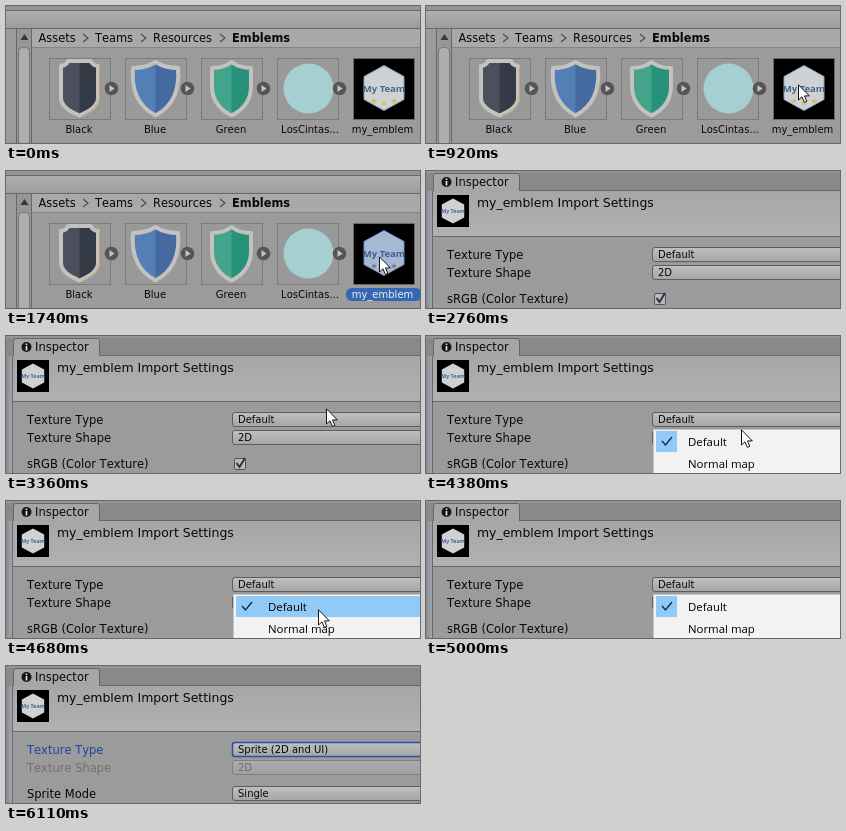
An HTML page that plays this animation: 414 by 137 pixels, repeating every 8530 ms.

```html
<!DOCTYPE html>
<html lang="en">
<head>
<meta charset="utf-8">
<title>Emblem import settings</title>
<style>
html, body { margin: 0; width: 100%; height: 100%; overflow: hidden; background: #9b9b9b; }
svg { display: block; width: 414px; height: 137px; }
text { font: 11.4px "DejaVu Sans", sans-serif; font-kerning: none; fill: #080808; }
.bold { font-weight: bold; }
.caption { font-size: 10px; text-anchor: middle; }
.title { font-size: 12.45px; }
.label { font-size: 11.5px; }
.value { font-size: 10px; }
.menu text { font: 11.4px "Open Sans", "Noto Sans", sans-serif; fill: #000; }
.badge { font: bold 9.5px "Open Sans", sans-serif; text-anchor: middle; fill: #46678f; }
.line { stroke: #686868; fill: none; }
.rim { stroke: #c3c2be; stroke-width: 4; stroke-linejoin: round; }
.off { fill: #707070; }

/* One 8530 ms loop, all changes are hard steps */
.browser, .inspector, .selected, .unselected, .before, .after,
.menu, .hover1, .hover2, .cursor { animation: 8530ms step-end infinite; }
.browser { animation-name: browser; }
.inspector { animation-name: inspector; }
.unselected { animation-name: unselected; }
.selected { animation-name: selected; }
.before { animation-name: before; }
.after { animation-name: after; }
.menu { animation-name: menu; }
.hover1 { animation-name: hover1; }
.hover2 { animation-name: hover2; }
.cursor { animation-name: cursor; }

@keyframes browser { 0% { opacity: 1 } 32.35%, 100% { opacity: 0 } }
@keyframes inspector { 0% { opacity: 0 } 32.35%, 100% { opacity: 1 } }
@keyframes unselected { 0% { opacity: 1 } 14.3%, 100% { opacity: 0 } }
@keyframes selected { 0% { opacity: 0 } 14.3%, 100% { opacity: 1 } }
@keyframes before { 0% { opacity: 1 } 71.62%, 100% { opacity: 0 } }
@keyframes after { 0% { opacity: 0 } 71.62%, 100% { opacity: 1 } }
@keyframes menu {
  0% { opacity: 0 } 42.9% { opacity: .4 } 44.31% { opacity: 1 } 71.62%, 100% { opacity: 0 }
}
@keyframes hover1 { 0% { opacity: 0 } 53.69% { opacity: 1 } 56.03%, 100% { opacity: 0 } }
@keyframes hover2 { 0% { opacity: 0 } 56.03% { opacity: 1 } 58.61%, 100% { opacity: 0 } }
@keyframes cursor {
  0% { transform: translate(500px, 0) }
  6.09% { transform: translate(351px, 113px) }
  7.26% { transform: translate(360px, 92px) }
  8.44% { transform: translate(366px, 78px) }
  9.61% { transform: translate(370px, 73px) }
  10.78% { transform: translate(372px, 78px) }
  11.95% { transform: translate(372px, 85px) }
  20.39% { transform: translate(373px, 85px) }
  32.35% { transform: translate(500px, 0) }
  35.87% { transform: translate(345px, 118px) }
  37.04% { transform: translate(336px, 100px) }
  38.21% { transform: translate(327px, 84px) }
  39.39% { transform: translate(320px, 72px) }
  40.56% { transform: translate(317px, 70px) }
  41.73% { transform: translate(316px, 77px) }
  42.9% { transform: translate(316px, 82px) }
  50.17% { transform: translate(316px, 88px) }
  51.34% { transform: translate(315px, 93px) }
  53.69% { transform: translate(314px, 99px) }
  54.86% { transform: translate(312px, 108px) }
  56.03% { transform: translate(310px, 119px) }
  57.21% { transform: translate(308px, 130px) }
  58.61%, 100% { transform: translate(500px, 0) }
}
</style>
</head>
<body>
<svg viewBox="0 0 414 137">
  <defs>
    <linearGradient id="bar" x2="0" y2="1">
      <stop stop-color="#b0b0b0"/><stop offset="1" stop-color="#9c9c9c"/>
    </linearGradient>
    <linearGradient id="head" x2="0" y2="1">
      <stop stop-color="#a6a6a6"/><stop offset="1" stop-color="#b1b1b1"/>
    </linearGradient>
    <linearGradient id="button" x2="0" y2="1">
      <stop stop-color="#c0c0c0"/><stop offset="1" stop-color="#a5a5a5"/>
    </linearGradient>
    <linearGradient id="pane" x2="1" y2="0">
      <stop stop-color="#858b93"/><stop offset="1" stop-color="#a4a6a9"/>
    </linearGradient>
    <rect id="tile" x=".5" y="52.5" width="61" height="61" fill="#999" stroke="#7b7b7b"/>
    <g id="expand">
      <circle cx="62.5" cy="82.5" r="6.8" fill="#555"/>
      <path d="M60.5 79l5 3.5-5 3.5z" fill="#c4c4c4"/>
    </g>
    <path id="notched" d="M12 60Q18 59 19 55H42Q43 59 49 60V92Q49 102 30.5 109.5Q12 102 12 92Z"/>
    <path id="peaked" d="M30.5 56Q40 62 53 62Q56 96 30.5 109.5Q5 96 8 62Q21 62 30.5 56Z"/>
    <path id="slim" d="M30.5 56Q38 62 50 62V80Q50 100 30.5 109.5Q11 100 11 80V62Q23 62 30.5 56Z"/>
    <clipPath id="right"><rect x="30.5" y="50" width="32" height="64"/></clipPath>
    <path id="hex" d="M0-22.5L20-11.5V11.5L0 22.5L-20 11.5V-11.5Z"/>
    <path id="star" d="M0-3L.9-1 3-.9 1.3.5 1.8 2.6 0 1.5-1.8 2.6-1.3.5-3-.9-.9-1Z"/>
    <g id="stars"><use href="#star" x="-10" y="13"/><use href="#star" y="15"/><use href="#star" x="10" y="13"/></g>
    <path id="chevron" d="M0 0L5 4L0 8" fill="none" stroke="#4c4c4c" stroke-width="1.2"/>
    <rect id="field" x="226.5" width="200" height="14" rx="2.5" fill="url(#button)" stroke="#5d5d5d"/>
  </defs>

  <g class="browser">
    <rect width="414" height="137" fill="#9b9b9b"/>
    <rect width="414" height="5" fill="#959595"/>
    <rect y="5" width="414" height="17" fill="url(#bar)"/>
    <rect x="26" y="23" width="388" height="18" fill="#a9a9a9"/>
    <path class="line" d="M0 4.5H414M0 22.5H414"/>
    <rect x="11" y="23" width="14" height="114" fill="#969696"/>
    <rect x="12.5" y="41.5" width="11" height="110" rx="4" fill="#aeaeae" stroke="#777"/>
    <path d="M14.5 34L18.5 28L22.5 34Z" fill="#383838"/>
    <path class="line" d="M10.5 23V137M25.5 23V137"/>
    <path d="M26 41.5H414" stroke="#858585"/>
    <text x="32.5" y="36">Assets</text>
    <text x="89" y="36">Teams</text>
    <text x="147" y="36">Resources</text>
    <text x="226" y="36" class="bold">Emblems</text>
    <use href="#chevron" x="77" y="28"/>
    <use href="#chevron" x="135" y="28"/>
    <use href="#chevron" x="214" y="28"/>

    <g transform="translate(43)">
      <use href="#tile"/>
      <use href="#notched" fill="#4b505c"/>
      <use href="#notched" fill="#343a46" clip-path="url(#right)"/>
      <use href="#notched" fill="none" class="rim"/>
      <path d="M50.5 61V93Q50 102 33 110" fill="none" stroke="#c5a56c"/>
      <use href="#expand"/>
      <text class="caption" x="30" y="127">Black</text>
    </g>
    <g transform="translate(119)">
      <use href="#tile"/>
      <use href="#peaked" fill="#547fb6"/>
      <use href="#peaked" fill="#446a9f" clip-path="url(#right)"/>
      <use href="#peaked" fill="none" class="rim"/>
      <use href="#expand"/>
      <text class="caption" x="30" y="127">Blue</text>
    </g>
    <g transform="translate(195)">
      <use href="#tile"/>
      <use href="#slim" fill="#43a48b"/>
      <use href="#slim" fill="#28917a" clip-path="url(#right)"/>
      <use href="#slim" fill="none" class="rim"/>
      <use href="#expand"/>
      <text class="caption" x="30" y="127">Green</text>
    </g>
    <g transform="translate(271)">
      <use href="#tile"/>
      <circle cx="31.5" cy="82.5" r="25" fill="#a5cfd0"/>
      <use href="#expand"/>
      <text class="caption" x="33" y="127">LosCintas...</text>
    </g>
    <rect x="347.5" y="52.5" width="61" height="61" stroke="#686868"/>
    <g class="unselected">
      <g transform="translate(378 82)">
        <use href="#hex" fill="#d0d1d3" stroke="#8ba3c0"/>
        <text class="badge" y="4">My Team</text>
        <use href="#stars" fill="#d9b75f"/>
      </g>
      <text class="caption" x="376.5" y="127">my_emblem</text>
    </g>
    <g class="selected">
      <g transform="translate(378 82)">
        <use href="#hex" fill="#a6b8d6" stroke="#7994bd"/>
        <text class="badge" y="4" style="fill:#3c5b8b">My Team</text>
        <use href="#stars" fill="#807f78"/>
      </g>
      <rect x="340" y="117" width="76" height="13" rx="6" fill="#3568b4"/>
      <text class="caption" x="376.5" y="127" style="fill:#eee">my_emblem</text>
    </g>
  </g>

  <g class="inspector">
    <rect width="414" height="137" fill="#9b9b9b"/>
    <rect width="414" height="20" fill="#898989"/>
    <rect width="414" height="2" fill="#959595"/>
    <rect y="20" width="6" height="117" fill="url(#pane)"/>
    <path d="M7.5 20V5Q7.5 2.5 10 2.5H91Q93.5 2.5 93.5 5V20" fill="#a6a6a6" stroke="#656565"/>
    <rect x="7" y="20" width="407" height="45" fill="url(#head)"/>
    <path class="line" d="M6.5 20V137M94 19.5H414M7 65.5H414"/>
    <circle cx="20.5" cy="11" r="5" fill="#151515"/>
    <path d="M20.5 7.5V9M20.5 10V14.5" stroke="#eee" stroke-width="1.6"/>
    <text x="29" y="15" class="label">Inspector</text>
    <rect x="11" y="24" width="32" height="32"/>
    <g transform="translate(27 40) scale(.56)">
      <use href="#hex" fill="#d0d1d3"/>
      <text class="badge" y="3">My Team</text>
    </g>
    <text class="title" x="51" y="36">my_emblem Import Settings</text>
    <use href="#field" y="76.5"/>

    <g class="before">
      <text class="label" x="21" y="88">Texture Type</text>
      <text class="label" x="21" y="106">Texture Shape</text>
      <text class="label" x="21" y="132">sRGB (Color Texture)</text>
      <text class="value" x="232" y="87">Default</text>
      <use href="#field" y="94.5"/>
      <text class="value" x="232" y="105">2D</text>
      <rect x="228.5" y="122.5" width="11" height="11" rx="1.5" fill="#bababa" stroke="#555"/>
      <path d="M230.5 127L233.5 131L239 122" fill="none" stroke="#25334d" stroke-width="2"/>
    </g>
    <g class="after">
      <rect x="226.5" y="76.5" width="200" height="14" rx="2.5" fill="none" stroke="#294fa8" stroke-width="1.5"/>
      <text class="label" x="21" y="88" style="fill:#1d44a8">Texture Type</text>
      <text class="label off" x="21" y="106">Texture Shape</text>
      <text class="label" x="21" y="132">Sprite Mode</text>
      <text class="value" x="232" y="87">Sprite (2D and UI)</text>
      <use href="#field" y="94.5" opacity=".45"/>
      <text class="value off" x="232" y="105">2D</text>
      <use href="#field" y="120.5"/>
      <text class="value" x="232" y="131">Single</text>
    </g>

    <g class="menu">
      <rect x="227.5" y="93.5" width="200" height="60" fill="#f2f2f2" stroke="#c6c6c6"/>
      <rect class="hover1" x="230" y="95" width="184" height="21" fill="#91c9f7"/>
      <rect class="hover2" x="230" y="117" width="184" height="20" fill="#91c9f7"/>
      <rect x="230" y="95" width="21" height="21" fill="#91c9f7"/>
      <path d="M236 105L239.5 109L246 101" fill="none" stroke="#1c2c3c" stroke-width="1.4"/>
      <text x="262" y="110">Default</text>
      <text x="262" y="132">Normal map</text>
    </g>
  </g>

  <g class="cursor">
    <path d="M.5 .8V16L4 12.8L6.4 18.4L8.8 17.4L6.5 11.9H11.3Z" fill="#fff" stroke="#151515"/>
  </g>
</svg>
</body>
</html>
```
